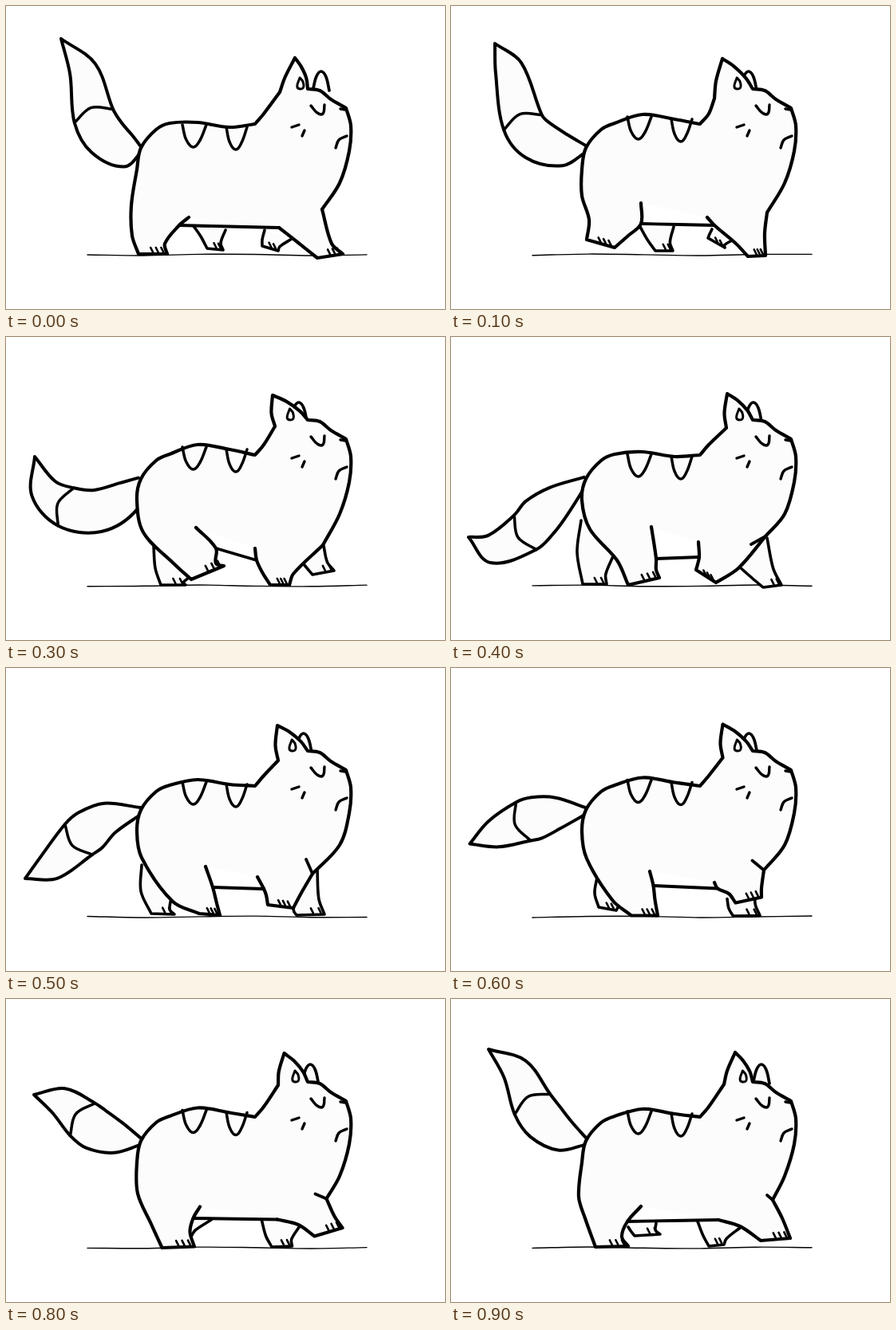
Animation of 550 by 380 pixels, one loop 1 s. Source, as an HTML page:

```html
<!DOCTYPE html>
<html lang="en">
<head>
<meta charset="utf-8">
<title>Walking cat</title>
<style>
html, body { margin: 0; width: 100%; height: 100%; overflow: hidden; background: #fff; }
svg { display: block; width: 100%; height: 100%; }
path { stroke: #000; fill: none; stroke-linecap: round; stroke-linejoin: round; }
g { display: none; }
g.on { display: inline; }
</style>
</head>
<body>
<svg id="stage" viewBox="0 0 550 380"></svg>
<script>
const STEP = 100, COUNT = 10;
const SKIN = '#fcfcfc';

// Key poses; steps that have none are halfway between their neighbours.
// head: back crest, ear base, ear tip       tail: spine from tip to root
// hind: top, knee, shin, toe, heel, hock, rump
// fore: fold, chest, shin, toe, heel, calf, elbow, top
// farHind, farFore: back, calf, heel, toe, front
const keys = [
  { at: 0, head: '240,146 343,108 362,65',
    tail: '69,41 96,79 110,138 126,165 154,183',
    hind: '229,265 217,275 199,298 202,311 166,311 158,288 157,250',
    fore: '396,255 396,255 408,298 422,311 390,316 365,296 342,278 342,278',
    farHind: '235,276 244,289 252,304 272,306 275,281',
    farFore: '324,281 321,293 321,301 341,307 358,292' },
  { at: 1, head: '240,136 330,116 340,66',
    tail: '55,47 72,77 90,146 108,168 143,181',
    hind: '238,247 238,273 222,288 205,303 170,293 173,268 164,238',
    fore: '396,259 396,259 393,285 394,313 372,314 357,298 330,275 321,265',
    farHind: '237,277 246,293 256,307 278,307 279,277',
    farFore: '327,280 324,286 322,291 343,303 354,293' },
  { at: 3, head: '240,135 337,112 334,73',
    tail: '36,150 47,190 75,213 115,218 154,199',
    hind: '238,239 263,265 263,284 273,287 232,304 210,284 172,245',
    fore: '397,261 397,261 360,297 355,311 331,311 321,295 314,280 312,265',
    farHind: '185,263 187,290 194,311 225,311 229,302',
    farFore: '373,285 378,291 384,298 411,293 398,262' },
  { at: 4, head: '240,144 345,114 346,71',
    tail: '22,251 48,266 93,245 112,225 136,204',
    hind: '251,238 257,278 257,292 261,302 222,311 208,280 174,241',
    fore: '376,260 394,250 360,290 332,308 307,292 309,285 311,276 310,257',
    farHind: '163,230 158,270 165,310 195,310 203,275',
    farFore: '361,288 378,303 391,314 414,311 396,252' },
  { at: 5, head: '240,140 341,116 340,72',
    tail: '24,264 54,250 91,215 106,203 130,188',
    hind: '250,249 259,275 264,295 268,310 242,308 209,293 170,238',
    fore: '376,240 384,258 370,282 360,301 328,297 326,285 323,277 315,262',
    farHind: '170,247 169,280 182,308 211,309 206,293',
    farFore: '360,302 361,306 364,310 399,309 390,253' },
  { at: 7, head: '240,135 340,109 341,69',
    tail: '23,177 52,167 90,170 108,173 138,176',
    hind: '248,261 248,271 247,286 250,311 210,313 196,290 170,240',
    fore: '379,243 400,249 408,270 418,274 385,292 370,281 345,276 345,276',
    farHind: '196,278 191,285 188,292 203,299 257,273',
    farFore: '332,277 335,297 343,312 375,312 373,284' },
  { at: 9, head: '240,138 342,107 356,67',
    tail: '47,63 80,88 102,132 118,154 143,172',
    hind: '238,260 221,279 214,298 222,310 181,311 168,275 160,248',
    fore: '396,246 403,252 415,275 425,300 388,303 362,285 335,277 335,277',
    farHind: '222,286 226,292 230,297 262,295 257,281',
    farFore: '309,279 316,297 323,310 342,308 362,287' }
];

const points = text => text.split(' ').map(s => s.split(',').map(Number));
for (const key of keys)
  for (const part in key) if (part !== 'at') key[part] = points(key[part]);

const lerp = (a, b, t) => a + (b - a) * t;
const mid = (p, q, t = 0.5) => [lerp(p[0], q[0], t), lerp(p[1], q[1], t)];
const move = (p, x, y) => [p[0] + x, p[1] + y];
const dist = (p, q) => Math.hypot(q[0] - p[0], q[1] - p[1]);
const corner = p => [p[0], p[1], true];

function poseAt(step) {
  const i = keys.findLastIndex(k => k.at <= step);
  const a = keys[i], b = keys[(i + 1) % keys.length];
  const gap = (b.at - a.at + COUNT) % COUNT;
  const t = (step - a.at) / gap;
  const pose = {};
  for (const part in a)
    if (part !== 'at') pose[part] = a[part].map((p, k) => mid(p, b[part][k], t));
  return pose;
}

// Smooth curve through the points, sharp at corners
function curve(pts) {
  let d = 'M' + pts[0].slice(0, 2);
  for (let i = 0; i < pts.length - 1; i++) {
    const p = pts[i], q = pts[i + 1];
    const before = p[2] || !i ? p : pts[i - 1];
    const after = q[2] ? q : pts[i + 2] || q;
    const reach = dist(p, q) / 3;
    const u = reach / (dist(before, q) || 1), v = reach / (dist(p, after) || 1);
    const c1 = move(p, (q[0] - before[0]) * u, (q[1] - before[1]) * u);
    const c2 = move(q, (p[0] - after[0]) * v, (p[1] - after[1]) * v);
    d += `C${c1} ${c2} ${q.slice(0, 2)}`;
  }
  return d;
}

const ink = (d, width, fill = 'none') =>
  `<path d="${d}" style="stroke-width:${width};fill:${fill}"/>`;
const line = (width, ...pts) => ink(curve(pts), width);

function toes(heel, toe, count) {
  let d = '';
  for (let i = 1; i <= count; i++) {
    const p = mid(heel, toe, 0.35 + 0.55 * i / count);
    d += `M${move(p, -4, -8)}L${move(p, -1, -2)}`;
  }
  return ink(d, 2.6);
}

function farLeg([back, calf, heel, toe, front]) {
  const ankle = move(mid(toe, front, 0.35), -4, 0);
  const d = curve([back, calf, corner(heel), corner(toe), ankle, front]);
  return ink(d, 3.6, SKIN) + toes(heel, toe, 2);
}

// Outline swells around the spine; the ring crosses it at the third point
function tail(spine) {
  const s = [...spine, [169, 179]];
  const side = sign => s.map((p, i) => {
    const a = s[Math.max(0, i - 1)], b = s[Math.min(5, i + 1)];
    const u = i / 5, len = dist(a, b);
    const half = sign * (25 * Math.sin(Math.PI * u) ** 0.8 + 4 * u);
    return move(p, (b[1] - a[1]) / len * half, (a[0] - b[0]) / len * half);
  });
  const upper = side(1), lower = side(-1);
  const outline = [...lower.slice(1).reverse(), corner(s[0]), ...upper.slice(1)];
  const k = 11 / dist(s[1], s[3]);
  const crown = move(s[2], (s[1][0] - s[3][0]) * k, (s[1][1] - s[3][1]) * k);
  return ink(curve(outline), 4, SKIN) + line(3.5, lower[2], crown, upper[2]);
}

function stripe(x, y, w) {
  return line(3.5, [x, y], [x + w * 0.15, y + 18], [x + w * 0.45, y + 28],
    [x + w * 0.74, y + 19], [x + w, y]);
}

function farEar(tip) {
  const t = [tip[0] + 33, 82];
  return ink(curve([move(t, -10, 21), move(t, -6, 6), t, move(t, 6, 7), move(t, 10, 24)]), 3.7, SKIN);
}

function innerEar(tip) {
  const p = [lerp(373, tip[0], 0.45), 90];
  return ink(curve([p, move(p, -3, 12), move(p, 4, 13), move(p, 4, 5), p]), 3);
}

function body({ head, hind, fore }) {
  const [crest, earBase, tip] = head;
  const [hip, knee, shin, toe, heel, hock, rump] = hind;
  const [fold, chest, shank, foreToe, foreHeel, calf, elbow, top] = fore;
  const earEnd = [378, 104];
  const outline = [
    hip, knee, shin, corner(toe), corner(heel), hock, rump,
    [164, 205], [169, 178], [188, 155], [205, 147], crest, move(crest, 40, 6), [312, 148, true],
    [323, 135], corner(earBase), move(mid(earBase, tip), -3, 3), corner(tip),
    move(mid(tip, earEnd, 0.35), 2, -3), move(mid(tip, earEnd, 0.7), 3, -2), corner(earEnd),
    [393, 106], [407, 117], [426, 128, true], [432, 150], [430, 182], [418, 222], corner(chest),
    shank, corner(foreToe), corner(foreHeel), calf, elbow, top
  ];
  return ink(curve(outline), 4.2, SKIN) + line(3.9, knee, elbow) + line(3.8, fold, chest) +
    toes(heel, toe, 3) + toes(foreHeel, foreToe, 3) +
    stripe(221, crest[1] + 3, 30) + stripe(276, crest[1] + 6, 26) + innerEar(tip);
}

const face = [
  '382,125 390,134 397,135 399,124', '419,129 425,130',
  '413,178 417,168 427,163', '358,152 367,149', '374,156 371,163'
].map(s => line(3.4, ...points(s))).join('');

function ground(step) {
  const pts = [];
  for (let i = 0; i <= 5; i++) pts.push([102 + i * 70, 312 + Math.sin(step * 2.4 + i * 1.9)]);
  return line(1.4, ...pts);
}

function draw(step) {
  const pose = poseAt(step);
  return '<g>' + ground(step) + farLeg(pose.farHind) + farLeg(pose.farFore) +
    tail(pose.tail) + farEar(pose.head[2]) + body(pose) + face + '</g>';
}

const stage = document.getElementById('stage');
stage.innerHTML = Array.from({ length: COUNT }, (_, i) => draw(i)).join('');
const groups = [...stage.children];

let begin = null;
function show(now) {
  if (begin === null) begin = now;
  const step = Math.floor(Math.max(0, now - begin) / STEP) % COUNT;
  groups.forEach((g, i) => g.classList.toggle('on', i === step));
  requestAnimationFrame(show);
}
groups[0].classList.add('on');
requestAnimationFrame(show);
</script>
</body>
</html>
```
